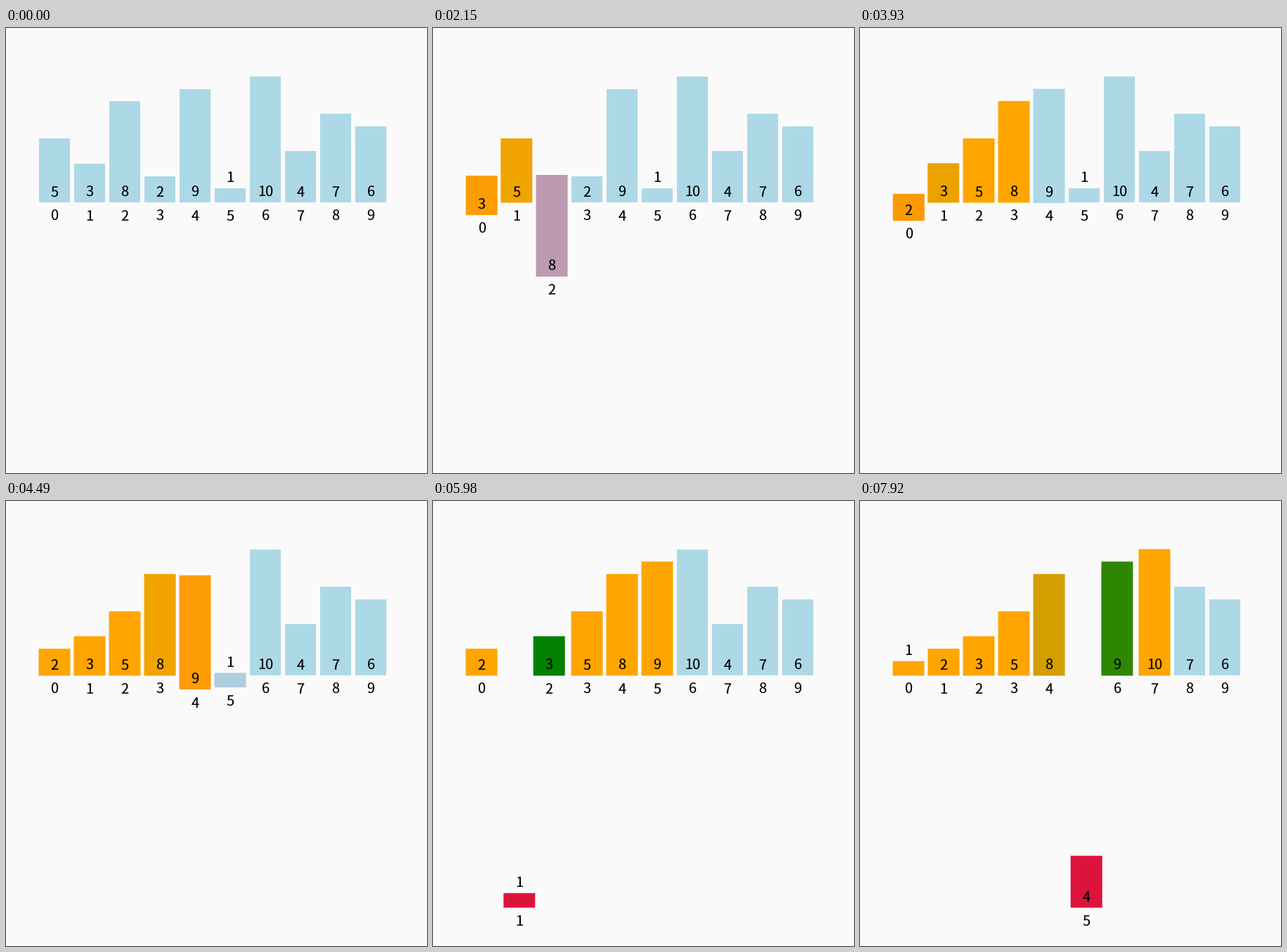
These frames come from a looping animation (599x633 px, 8000 ms). A matplotlib script:

```python
import matplotlib.pyplot as plt
import numpy as np
from matplotlib.animation import FuncAnimation
from matplotlib.colors import to_rgb
from matplotlib.patches import Rectangle

W, H, DPI = 599, 633, 100
LOOP, TICK = 8000, 20
VALUES = [5, 3, 8, 2, 9, 1, 10, 4, 7, 6]
BASE, DROP, PITCH, LEFT, WIDTH = 248, 330, 50, 47, 44
UNIT, EXTRA, OUTLINE = 17.7, 2.02, 0.5
EASE_MS = 232

BLUE, ORANGE, RED, GREEN = (
    np.array(to_rgb(c)) for c in ("lightblue", "orange", "crimson", "green"))

# A new sorting step begins about every 170 ms
STEP_AT = np.interp(range(40), [0, 16, 22, 39], [1203, 3914, 4958, 7848])


def insertion_steps(values):
    """Yield (order, sorted count, lifted bar, compared bar) per step."""
    order = list(range(len(values)))
    yield order[:], 1, None, None
    for i in range(1, len(order)):
        key = order[i]
        yield order[:], i, key, None
        j = i
        while j > 0:
            other = order[j - 1]
            yield order[:], i + 1, key, other
            if values[other] < values[key]:
                break
            order[j - 1], order[j] = key, other
            j -= 1
            yield order[:], i + 1, key, other
        yield order[:], i + 1, None, None


def target(order, done, key, compared):
    """Rows of slot, drop, r, g, b for every bar."""
    rows = np.zeros((len(order), 5))
    for slot, bar in enumerate(order):
        color = ORANGE if slot < done else BLUE
        if bar == key:
            color = RED
        elif bar == compared:
            color = GREEN
        rows[bar] = [slot, DROP if bar == key else 0, *color]
    return rows


def ease(u):
    u = min(max(u, 0), 1)
    return 4 * u**3 if u < 0.5 else 1 - 4 * (1 - u)**3


def blend(a, b, ms):
    return a + (b - a) * ease(ms / EASE_MS)


# Each step starts from wherever the previous one was interrupted
REST = target(range(len(VALUES)), 0, None, None)
legs = []
pose, goal, begun = REST, REST, 0
for at, step in zip(STEP_AT, insertion_steps(VALUES)):
    pose = blend(pose, goal, at - begun)
    goal, begun = target(*step), at
    legs.append((pose, goal))


def bars_at(t):
    k = np.searchsorted(STEP_AT, t, side="right") - 1
    if k < 0:
        return REST, REST[:, 0]
    start, end = legs[k]
    return blend(start, end, t - STEP_AT[k]), end[:, 0]


plt.rcParams["text.hinting"] = "none"
fig = plt.figure(figsize=(W / DPI, H / DPI), dpi=DPI, facecolor="#fafafa")
ax = fig.add_axes([0, 0, 1, 1])
ax.set(xlim=(0, W), ylim=(H, 0))
ax.axis("off")


def make_text(s):
    return ax.text(0, 0, s, ha="center", va="baseline", color="black",
                   family="Noto Sans CJK JP", fontsize=20 * 72 / DPI, zorder=3)


rects = [ax.add_patch(Rectangle((0, 0), 1, 1, linewidth=0)) for _ in VALUES]
numbers = [make_text(str(v)) for v in VALUES]
labels = [make_text("") for _ in VALUES]


def draw(frame):
    rows, slots = bars_at((frame + 0.5) * TICK)
    for i, (slot, drop, *rgb) in enumerate(rows):
        x, bottom = LEFT + PITCH * slot, BASE + drop
        h = UNIT * VALUES[i] + EXTRA
        # Untouched bars have crisp edges, the others a thin soft outline
        untouched = np.allclose(rows[i], REST[i])
        pad = 0 if untouched else OUTLINE
        rects[i].set_snap(bool(untouched))
        rects[i].set_bounds(x - pad, bottom - h - pad,
                            WIDTH + 2 * pad, h + 2 * pad)
        rects[i].set_facecolor(np.clip(rgb, 0, 1))
        mid = x + WIDTH / 2
        rise = 29 if VALUES[i] == 1 else 8
        numbers[i].set_position((mid, bottom - rise))
        labels[i].set_position((mid, bottom + 26))
        labels[i].set_text(str(int(slots[i])))
    return rects + numbers + labels


anim = FuncAnimation(fig, draw, frames=LOOP // TICK, interval=TICK,
                     init_func=lambda: draw(0), repeat=True, repeat_delay=0)
plt.show()
```
